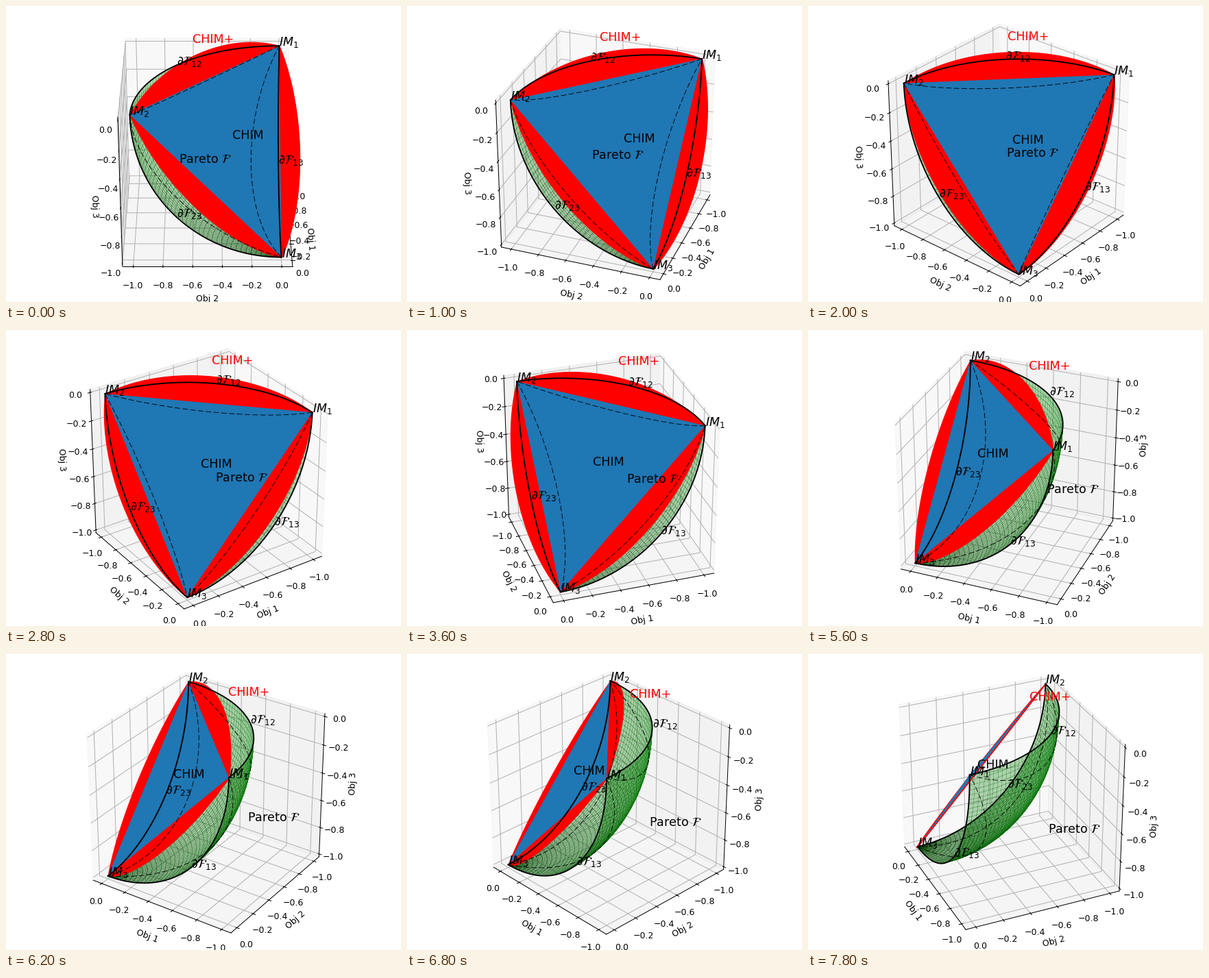
A matplotlib script that plays this animation: 576x432 px, repeating every 8000 ms.

```python
import numpy as np
import matplotlib.pyplot as plt
from matplotlib.animation import FuncAnimation
from mpl_toolkits.mplot3d.art3d import Poly3DCollection

FRAMES, INTERVAL = 40, 200
DEG_PER_FRAME = 4
ELEV = 30
NORMAL = np.ones(3)

fig = plt.figure(figsize=(6.4, 4.8), dpi=90)
ax = fig.add_axes([0, 0, 1, 1], projection="3d", computed_zorder=False)
ax.set_box_aspect((1, 1, 1), zoom=3 ** 0.5 / 1.8294640721620434)


def padded(lo, hi):
    pad = (hi - lo) / 48
    return lo - pad, hi + pad


ax.set_xlim(*padded(-1.05, 0.05))
ax.set_ylim(*padded(-1.05, 0.05))
ax.set_zlim(*padded(-1, 0))
ax.set_xlabel("Obj 1")
ax.set_ylabel("Obj 2")
ax.set_zlabel("Obj 3")

# Individual minima: one negative unit vector per objective
minima = -np.eye(3)
pairs = [(0, 1), (1, 2), (2, 0)]


def arc(p, q, n=60):
    """Quarter circle from p to q on the unit sphere."""
    t = np.linspace(0, np.pi / 2, n)[:, None]
    return np.cos(t) * p + np.sin(t) * q


def to_plane(pts):
    """Project points along the normal onto the plane x + y + z = -1."""
    return pts - (pts.sum(axis=1, keepdims=True) + 1) / 3 * NORMAL


def to_sphere(pts):
    """Push points of that plane along the normal onto the unit sphere."""
    gap = 1 - (pts ** 2).sum(axis=1, keepdims=True)
    return pts - (1 - np.sqrt(1 + 3 * gap)) / -3 * NORMAL


def label(pos, text, color="k"):
    ax.text(*pos, text, color=color, fontsize=14, zorder=6)


# Pareto front: the negative octant of the sphere
angle = np.linspace(0, np.pi / 2, 46)
phi, theta = np.meshgrid(angle, angle)
ax.plot_surface(-np.sin(theta) * np.cos(phi), -np.sin(theta) * np.sin(phi),
                -np.cos(theta), rstride=1, cstride=1, color="green",
                alpha=0.3, linewidth=0, antialiased=False, zorder=1)

arcs = [arc(minima[i], minima[j]) for i, j in pairs]
outline = to_plane(np.vstack(arcs))
ax.add_collection3d(Poly3DCollection([outline], facecolor="red",
                                     edgecolor="red", linewidth=1, zorder=2))
ax.add_collection3d(Poly3DCollection([minima], facecolor="C0",
                                     linewidth=0, zorder=3))

mix = np.linspace(0, 1, 60)[:, None]
for (i, j), curve in zip(pairs, arcs):
    edge = to_sphere((1 - mix) * minima[i] + mix * minima[j])
    ax.plot(*edge.T, "k", linewidth=0.7, dashes=(9, 4), zorder=4)
    ax.plot(*curve.T, "k", linewidth=1.5, zorder=5)
    a, b = sorted((i + 1, j + 1))
    label(curve.mean(axis=0) / np.linalg.norm(curve.mean(axis=0)),
          rf"$\partial\mathcal{{F}}_{{{a}{b}}}$")

for k, point in enumerate(minima, 1):
    label(point, f"$IM_{k}$")
label(-NORMAL / 3, "CHIM")
label(-0.7 * NORMAL, r"Pareto $\mathcal{F}$")
label((-0.6, -0.6, 0.2), "CHIM+", "red")


def update(frame):
    ax.view_init(elev=ELEV, azim=DEG_PER_FRAME * frame)
    return []


anim = FuncAnimation(fig, update, frames=FRAMES, interval=INTERVAL,
                     repeat=True, repeat_delay=0)
plt.show()
```
